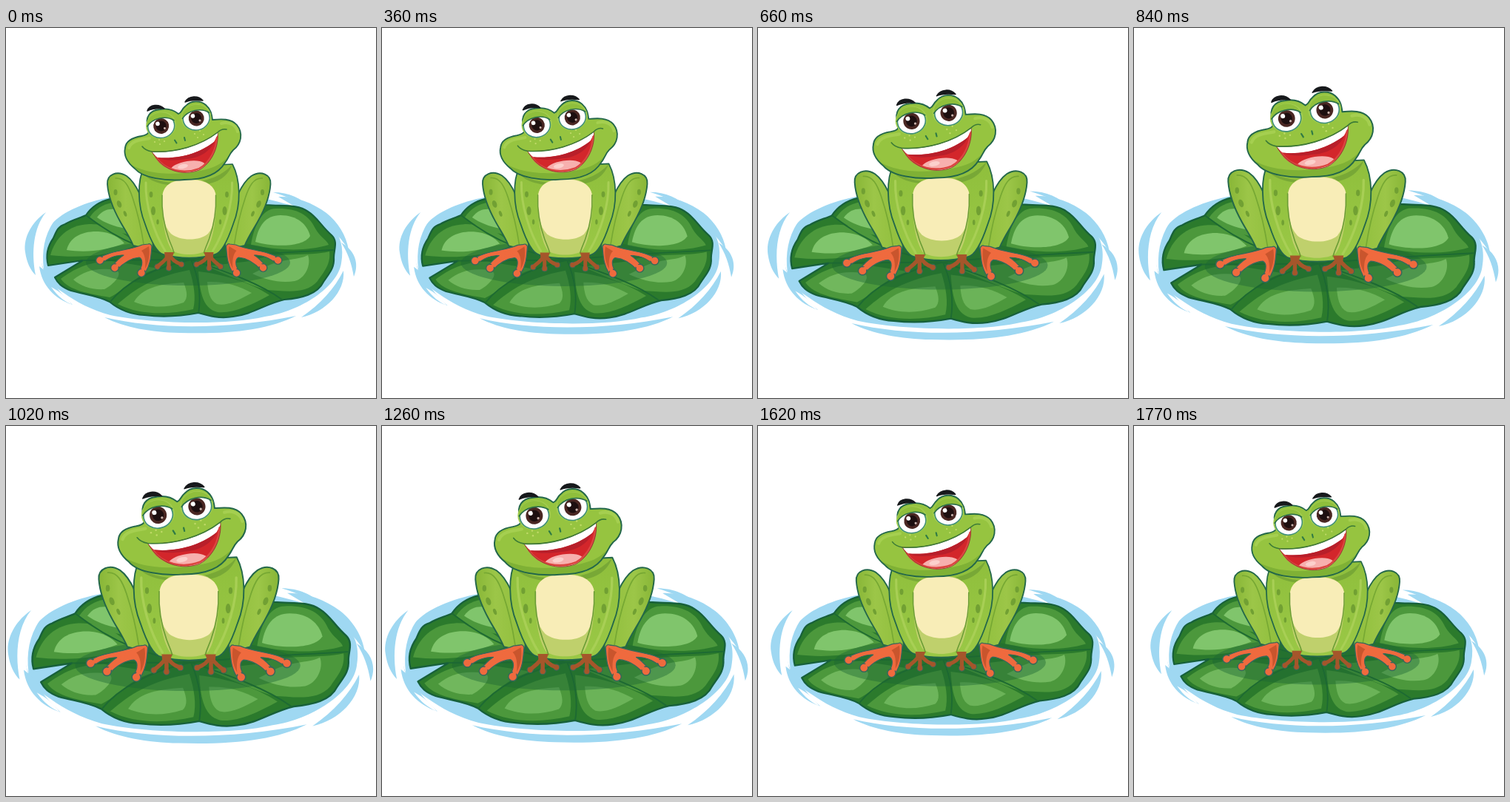
An HTML page for the animation above (1.8 s loop, 500 by 500 pixels).

```html
<!DOCTYPE html>
<html lang="en">
<head>
<meta charset="utf-8">
<title>Frog on a lily pad</title>
<style>
  html, body { margin: 0; width: 100%; height: 100%; overflow: hidden; background: #fff; }
  svg { display: block; width: 100vw; height: 100vh; }
</style>
</head>
<body>
<svg viewBox="0 0 500 500" stroke-linecap="round" stroke-linejoin="round">
  <defs>
    <linearGradient id="skin" x1="0" y1="0" x2="0" y2="1">
      <stop offset="0" stop-color="#8fbf3c"/>
      <stop offset="1" stop-color="#9ac846"/>
    </linearGradient>
    <linearGradient id="thigh" x1="0" y1="0" x2="1" y2="0">
      <stop offset="0" stop-color="#88b637"/>
      <stop offset=".4" stop-color="#9cc648"/>
      <stop offset="1" stop-color="#8fbe3c"/>
    </linearGradient>
    <clipPath id="padClip"><use href="#padShape"/></clipPath>
    <clipPath id="headClip"><use href="#headShape"/></clipPath>
    <clipPath id="mouthClip"><use href="#mouthShape"/></clipPath>
    <path id="padShape" d="M104 314L57 321C53 306 57 294 64 284C68 275 70 268 80 265C90 259 100 257 108 253C116 241 128 234 141 231L250 225L352 239C375 241 394 238 408 248C421 256 426 268 440 280C449 289 443 299 443 310C444 325 436 332 429 343C421 360 399 365 376 367C350 373 333 387 307 390C288 393 274 389 260 385C239 389 212 391 187 388C167 387 152 380 140 370C125 362 106 360 88 355C75 350 70 345 66 337Z"/>
    <path id="headShape" d="M161 162C162 152 171 148 183 146C193 144 194 141 192 135C187 120 195 111 208 110C219 108 228 112 233 116C238 114 237 110 242 106C250 97 263 98 270 104C277 110 278 117 279 124C291 123 304 122 312 131C321 142 318 157 307 165C301 171 301 176 296 182C286 199 265 205 241 205C216 207 185 203 174 190C163 181 159 171 161 162Z"/>
    <path id="mouthShape" d="M197 167C229 169 263 159 286 141C288 159 279 182 261 192C240 200 213 195 197 167Z"/>

    <g id="leg">
      <path d="M137 211C136 198 150 192 163 200C180 212 190 246 196 272C199 283 200 292 197 300L172 294C166 280 160 272 154 261C144 243 138 226 137 211Z" fill="url(#thigh)" stroke="#23674a" stroke-width="1.8"/>
      <path d="M148 203C160 202 166 214 171 229C178 250 183 272 186 292" fill="none" stroke="#76a833" stroke-width="1.6"/>
      <g fill="#71a033">
        <ellipse cx="148" cy="222" rx="2.5" ry="4"/>
        <ellipse cx="153" cy="238" rx="3" ry="5" transform="rotate(-20 153 238)"/>
        <ellipse cx="161" cy="251" rx="2" ry="4" transform="rotate(-20 161 251)"/>
      </g>
    </g>

    <g id="hind" fill="#ef6a3e" stroke="#35685a" stroke-width="1.2">
      <path d="M192 292C194 291 196 292 197 295C196 306 196 319 188 331L180 328C185 320 185 312 180 310C168 311 158 318 150 327L143 322C149 315 154 310 159 307C148 306 139 311 129 318L125 311C142 300 166 301 184 293Z"/>
      <g stroke-width="1.4">
        <circle cx="127" cy="314" r="5.4"/>
        <circle cx="147" cy="324" r="5.4"/>
        <circle cx="183" cy="331" r="5.4"/>
      </g>
      <path d="M130 313C141 305 154 304 168 303M149 322C157 314 166 309 178 306M185 327C189 319 190 311 189 303" fill="none" stroke="#ef6a3e" stroke-width="4.5"/>
      <path d="M193 295C195 305 193 317 188 325C189 315 188 306 183 301Z" fill="#c9552d" stroke="none"/>
    </g>

    <g id="fore">
      <g fill="#a5562b" stroke="#35685a" stroke-width="1">
        <circle cx="204.500" cy="322.500" r="3.8"/>
        <circle cx="220" cy="324.500" r="3.8"/>
        <circle cx="237" cy="319.500" r="3.8"/>
      </g>
      <path d="M220 306C217 313 211 317 206 321M220 306L220 323M221 306C224 313 230 317 236 319" fill="none" stroke="#a5562b" stroke-width="5"/>
      <path d="M214 303H227L224 312H215Z" fill="#a5562b"/>
    </g>

    <g id="arm" fill="none">
      <path d="M211 226C210 248 214 268 220 285C223 293 226 299 227 304" stroke="#6b9d35" stroke-width="1.5"/>
      <path d="M189 209C188 239 200 277 215 301" stroke="#a8cf55" stroke-width="3"/>
      <g fill="#71a033">
        <ellipse cx="196" cy="225" rx="2.4" ry="4"/>
        <ellipse cx="199" cy="247" rx="3" ry="6"/>
        <ellipse cx="205" cy="262" rx="1.7" ry="3.500"/>
      </g>
    </g>

    <g id="eye">
      <ellipse rx="20.500" ry="18" fill="#a3cd50"/>
      <ellipse cy="1" rx="18" ry="16" fill="#fff" stroke="#3f8f78" stroke-width="1.5"/>
      <circle cy="1" r="10.500" fill="#4a2723"/>
      <circle cy="1" r="7" fill="#1d0f10"/>
      <circle cx="-4" cy="-3" r="2.8" fill="#fff"/>
      <circle cx="4" cy="5" r="1.5" fill="#c9b1ab"/>
      <path d="M-18.500 -3C-16 -22 15 -22 18.500 -3C10 -12 -8 -12 -18.500 -3Z" fill="#8fbf3c"/>
      <path d="M-18.500 -2.500C-9 -12 9 -12 18.500 -3" fill="none" stroke="#2d7049" stroke-width="1.6"/>
    </g>
  </defs>

  <g id="scene">
    <g id="water" fill="#9fd8f2">
      <path d="M140 229C108 235 76 248 62 265C49 279 45 296 48 316C50 333 60 347 78 358C95 370 115 381 141 388C198 400 300 402 350 390C398 383 448 350 453 318C457 297 452 280 440 268C425 252 392 240 352 231Z"/>
      <path d="M54 249C35 262 23 283 26 303C28 317 33 327 40 334C34 303 37 270 54 249Z"/>
      <path d="M45 322C48 348 66 366 90 374C77 362 64 348 60 334Z"/>
      <path d="M361 222C382 222 400 230 411 243C396 235 381 228 361 222Z"/>
      <path d="M368 228C389 227 413 235 433 250C448 262 460 280 463 300C451 280 431 261 405 250Z"/>
      <path d="M453 290C471 300 478 318 470 336C467 318 462 304 453 290Z"/>
      <path d="M456 328C459 356 432 384 399 391C425 373 444 352 456 328Z"/>
      <path d="M133 391C206 408 302 407 392 389C354 408 302 414 235 412C196 411 160 405 133 391Z"/>
      <path d="M64 262C47 276 41 301 51 326C48 301 52 281 64 262ZM61 350C70 363 79 369 89 374C82 364 74 357 61 350Z" fill="#fff"/>
    </g>

    <use href="#padShape" fill="#2b7a2c" stroke="#17603a" stroke-width="2.2"/>
    <g clip-path="url(#padClip)">
      <g fill="#4c983c">
        <path d="M60 307C66 284 84 266 112 265C141 264 162 278 177 293C148 306 103 312 60 307Z"/>
        <path d="M113 256C121 244 132 238 144 236L173 280C148 277 130 269 113 256Z"/>
        <path d="M331 293C335 269 345 244 365 244C391 243 409 251 418 271C425 283 434 287 436 293C406 302 370 301 331 293Z"/>
        <path d="M330 315C366 302 409 309 437 302C439 319 430 329 421 342C405 361 376 355 352 354C328 347 302 335 271 322Z"/>
        <path d="M260 329C290 332 329 343 356 361C332 374 308 386 286 384C264 379 262 352 260 329Z"/>
        <path d="M248 327C254 346 257 364 253 380C218 388 180 388 151 373C168 359 190 338 248 327Z"/>
        <path d="M74 339C92 326 109 316 143 315L206 325C174 333 162 354 140 364C113 359 85 355 74 339Z"/>
      </g>
      <g fill="#80c56c">
        <path d="M82 300C86 282 104 274 125 275C142 276 153 283 160 291C134 301 108 304 82 300Z"/>
        <path d="M123 256C130 246 139 244 147 245L162 271C145 268 133 263 123 256Z"/>
        <path d="M337 289C341 267 351 253 371 253C393 253 407 265 411 281C402 297 359 296 337 289Z"/>
        <path d="M345 326C371 310 393 315 408 307C413 320 404 339 390 342C371 345 352 341 333 332Z" opacity=".75"/>
        <path d="M272 343C295 342 314 348 332 358C313 369 297 376 285 373C275 368 273 356 272 343Z" opacity=".6"/>
        <path d="M173 370C184 351 207 346 240 344C245 356 246 365 240 371C216 379 192 378 173 370Z" opacity=".65"/>
        <path d="M91 340C106 328 123 323 148 327C160 331 145 347 133 353C116 354 101 349 91 340Z" opacity=".7"/>
      </g>
      <path d="M250 313L104 314M250 313C198 305 155 290 108 253M250 313C209 322 166 338 140 371M250 313C261 338 264 361 260 386M250 313C299 330 341 344 373 367M250 313C320 306 383 303 442 300" fill="none" stroke="#1d6a32" stroke-width="1.8"/>
      <ellipse cx="246" cy="317" rx="138" ry="31" fill="#1b6534" opacity=".42"/>
    </g>

    <use href="#leg"/>
    <use href="#leg" transform="matrix(-1 0 0 1 494.5 0)"/>
    <path d="M186 190C178 205 177 238 188 265C195 286 203 304 213 306C234 312 261 312 282 306C292 304 300 286 307 265C318 238 317 205 306 184Z" fill="url(#skin)" stroke="#23674a" stroke-width="1.7"/>
    <path d="M184 196C211 216 280 216 306 184C298 205 280 213 249 213C219 214 198 211 184 196Z" fill="#6e9f34" opacity=".7"/>
    <path d="M211 234C211 212 224 204 247 204C271 204 284 213 284 234C284 261 279 288 271 300C261 308 234 308 224 300C215 287 211 261 211 234Z" fill="#bfd06c"/>
    <path d="M211 231C211 212 224 205 247 205C271 205 284 213 284 231C284 251 282 267 273 278C262 288 235 288 223 278C213 268 211 251 211 231Z" fill="#f8edb7"/>
    <use href="#arm"/>
    <use href="#arm" transform="matrix(-1 0 0 1 494.5 0)"/>
    <use href="#fore"/>
    <use href="#fore" transform="matrix(-1 0 0 1 494.5 0)"/>
    <use href="#hind"/>
    <use href="#hind" transform="matrix(-1 0 0 1 494.5 0)"/>

    <use href="#headShape" fill="#96c440"/>
    <g clip-path="url(#headClip)">
      <path d="M158 174C176 202 245 201 280 188C301 180 307 163 320 147V209H160Z" fill="#7fb135"/>
      <path d="M166 162C170 151 185 151 194 149M291 129C302 126 311 131 313 140" fill="none" stroke="#a5cf50" stroke-width="4"/>
    </g>
    <use href="#headShape" fill="none" stroke="#23674a" stroke-width="1.8"/>
    <use href="#eye" transform="translate(209.500 131.500) rotate(-12)"/>
    <use href="#eye" transform="translate(257 121) rotate(-12)"/>
    <g fill="#17191c" stroke="#17191c" stroke-width="1.5">
      <path d="M191 112C194 103 207 102 214 109C206 108 198 109 191 112Z"/>
      <path d="M242 100C247 91 260 91 266 98C257 97 249 97 242 100Z"/>
    </g>
    <path d="M228 151.500L230.500 155.500M241 148L242 152" fill="none" stroke="#2f7a45" stroke-width="2"/>
    <g id="freckles" fill="#c0da68"></g>

    <use href="#mouthShape" fill="#d3262b"/>
    <g clip-path="url(#mouthClip)">
      <path d="M195 165C229 169 263 159 290 137L281 154C264 168 235 178 204 175Z" fill="#fff"/>
      <path d="M204 175C235 178 264 168 282 153C277 165 263 176 243 177C228 179 216 180 204 175Z" fill="#b81f2a"/>
      <ellipse cx="246" cy="189" rx="24" ry="9" fill="#f7b0ae" transform="rotate(-9 246 189)"/>
      <ellipse cx="239" cy="187" rx="7" ry="3" fill="#fcd0cc" transform="rotate(-12 239 187)"/>
    </g>
    <path d="M203 175C215 193 240 198 261 190C277 181 284 163 285 148" fill="none" stroke="#dc4540" stroke-width="2.4"/>
    <use href="#mouthShape" fill="none" stroke="#8d3a30" stroke-width=".8"/>
    <path d="M184 160C187 164 191 166 197 167C229 169 263 159 286 141C290 137 294 136 298 137" fill="none" stroke="#3b7b36" stroke-width="1.5"/>
  </g>
</svg>
<script>
const LOOP = 1800, REST = 240, STEP = 30;
const scene = document.getElementById("scene");
const spots = [[201, 154], [208, 157], [214, 153], [207, 151],
               [255, 143], [262, 139], [267, 144], [259, 148]];
document.getElementById("freckles").innerHTML =
  spots.map(([x, y]) => `<circle cx="${x}" cy="${y}" r="1.1"/>`).join("");

// Still at first, then a slow swell and return around the stage centre.
function zoom(ms) {
  if (ms < REST) return 1;
  const t = Math.floor(ms / STEP) * STEP;
  return 1 + 0.052 * (1 - Math.cos((t - 187) / LOOP * 2 * Math.PI));
}

function draw(now) {
  const s = zoom(now % LOOP);
  scene.setAttribute("transform", `translate(250 250) scale(${s}) translate(-250 -250)`);
  requestAnimationFrame(draw);
}
draw(performance.now());
</script>
</body>
</html>
```
